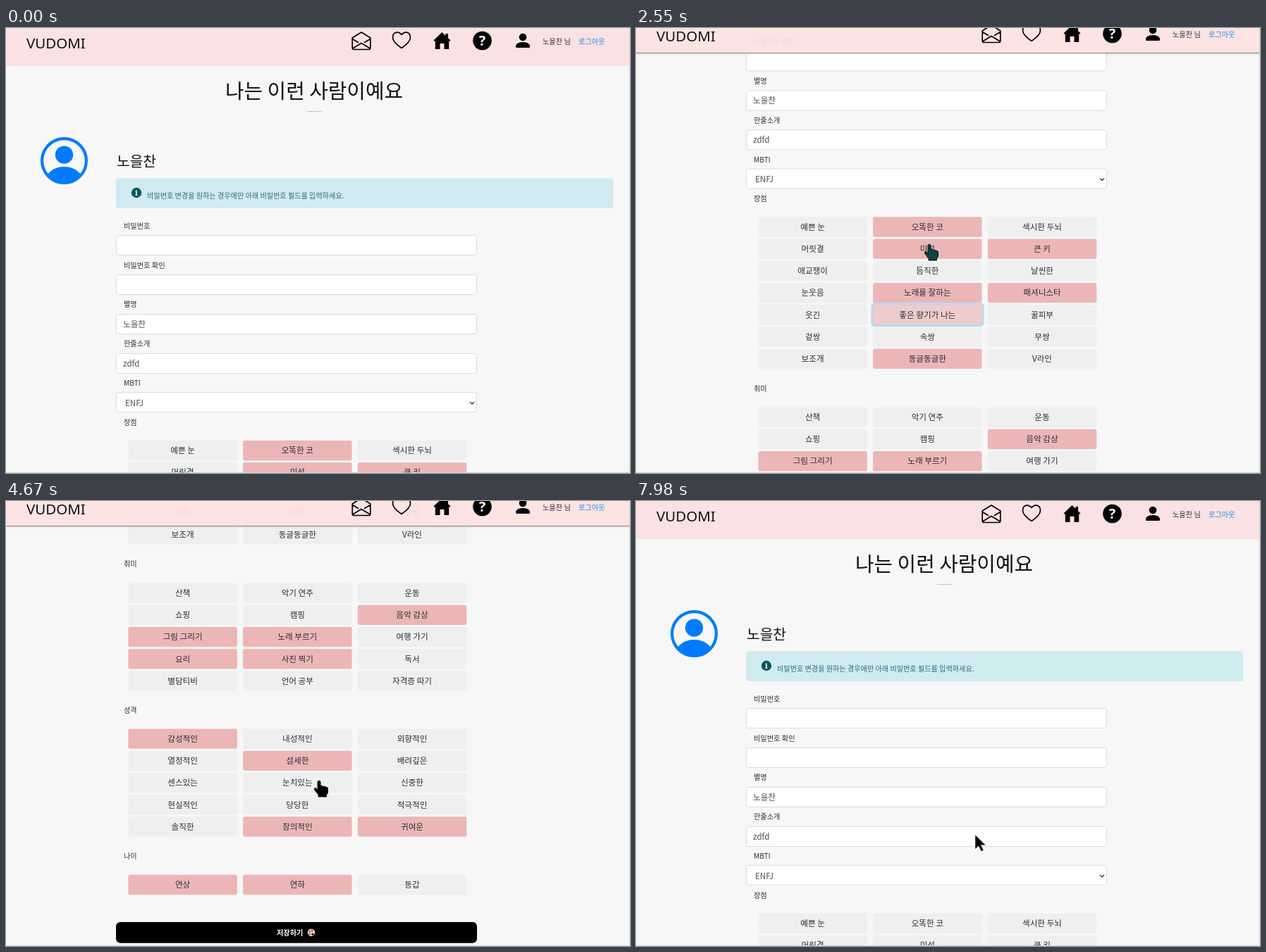
An HTML page with a canvas that plays this animation: 885x632 px, repeating every 8000 ms.

```html
<!DOCTYPE html>
<html lang="ko">
<head>
<meta charset="utf-8">
<style>
html, body { margin: 0; width: 100%; height: 100%; overflow: hidden; background: #f7f7f7; }
canvas { display: block; }
</style>
</head>
<body>
<canvas id="stage" width="885" height="632"></canvas>
<script>
const W = 885, H = 632, LOOP = 8000, RELOAD = 7620;
const ctx = document.getElementById('stage').getContext('2d');
const KR = '"Noto Sans CJK KR", "Noto Sans KR", "Noto Sans CJK", sans-serif';
const INK = '#2a2e32', GRAY = [239, 239, 239], PINK = [236, 182, 183], PALE = [238, 204, 204];
const USER = '노을찬', BRAND = 'VUDOMI';

const TRAITS = '예쁜 눈,오똑한 코,섹시한 두뇌,머릿결,미성,큰 키,애교쟁이,듬직한,날씬한,눈웃음,노래를 잘하는,패셔니스타,웃긴,좋은 향기가 나는,꿀피부,겉쌍,속쌍,무쌍,보조개,동글동글한,V라인';
const HOBBIES = '산책,악기 연주,운동,쇼핑,캠핑,음악 감상,그림 그리기,노래 부르기,여행 가기,요리,사진 찍기,독서,별담티비,언어 공부,자격증 따기';
const NATURE = '감성적인,내성적인,외향적인,열정적인,섬세한,배려깊은,센스있는,눈치있는,신중한,현실적인,당당한,적극적인,솔직한,창의적인,귀여운';
const MY_HOBBIES = [5, 6, 7, 9, 10];

const group = (id, title, labelY, rowY, names, on) =>
  ({ id, title, labelY, rowY, names: names.split(','), on });
const groups = [
  group('a', '장점', 560, 600, TRAITS, [1, 4, 5, 11, 19]),
  group('b', '취미', 829.7, 870.3, HOBBIES, MY_HOBBIES),
  group('c', '성격', 1037.5, 1077.5, NATURE, [4, 5, 7, 8, 10, 11, 14]),
  group('d', '장점', 1340, 1380.5, TRAITS, []),
  group('e', '취미', 1610, 1651, HOBBIES, MY_HOBBIES),
  group('f', '성격', 1818, 1858, NATURE, [0, 4, 13, 14]),
  group('g', '나이', 2025, 2065.3, '연상,연하,동갑', [0, 1])
];

// time, group and index of each toggle
const clicks = [
  [2160, 'a10'], [2380, 'a13'], [2880, 'a4'], [3080, 'a1'],
  [5220, 'f4'], [5640, 'f13'], [6230, 'f14'], [6690, 'g1']
];
const SAVE_CLICK = 7420;

// time, x, y of the pointer tip
const pointer = [
  [660, 250, 640], [880, 294, 458], [1500, 294, 458], [1950, 416, 376], [2200, 416, 378],
  [2340, 416, 408], [2430, 416, 408], [2550, 416, 307], [2900, 416, 305], [3040, 416, 284],
  [3130, 416, 284], [3360, 556, 300], [3500, 556, 300], [3850, 444, 397], [4800, 444, 397],
  [5120, 444, 362], [5280, 444, 362], [5560, 443, 452], [5970, 443, 452], [6160, 560, 452],
  [6300, 560, 452], [6580, 441, 528], [6800, 441, 528], [7080, 430, 592], [7640, 430, 592],
  [7940, 481, 474]
];

const clamp = v => Math.max(0, Math.min(1, v));
const span = (t, a, b) => clamp((t - a) / (b - a));
const smooth = u => u * u * (3 - 2 * u);
const easeOut = u => 1 - (1 - u) ** 3;
const mix = (a, b, u) => a + (b - a) * u;
const mixRgb = (a, b, u) => `rgb(${a.map((v, i) => Math.round(mix(v, b[i], u)))})`;

function scrollAt(t) {
  if (t >= RELOAD) return 0;
  return 215 * smooth(span(t, 800, 1340)) + 102.5 * smooth(span(t, 1480, 1900)) +
    442 * smooth(span(t, 3500, 4200)) + 770 * easeOut(span(t, 4350, 4766));
}

function pointerAt(t) {
  const i = pointer.findIndex(k => k[0] > t);
  if (i < 0) return pointer[pointer.length - 1].slice(1);
  if (i === 0) return null;
  const [a, b] = [pointer[i - 1], pointer[i]];
  const u = smooth(span(t, a[0], b[0]));
  return [mix(a[1], b[1], u), mix(a[2], b[2], u)];
}

function text(s, x, cy, size, color = INK, align = 'left', weight = 400, family = KR) {
  ctx.font = `${weight} ${size}px ${family}`;
  ctx.textAlign = align;
  ctx.fillStyle = color;
  ctx.fillText(s, x, cy + size * 0.37);
}

function box(x, y, w, h, r, fill, stroke, line = 1) {
  ctx.beginPath();
  ctx.roundRect(x, y, w, h, r);
  if (fill) { ctx.fillStyle = fill; ctx.fill(); }
  if (stroke) { ctx.strokeStyle = stroke; ctx.lineWidth = line; ctx.stroke(); }
}

function disc(x, y, r, fill) {
  ctx.beginPath();
  ctx.arc(x, y, r, 0, Math.PI * 2);
  ctx.fillStyle = fill;
  ctx.fill();
}

function at(x, y, draw) {
  ctx.save();
  ctx.translate(x, y);
  draw();
  ctx.restore();
}

function shape(d, fill, stroke, line) {
  const p = new Path2D(d);
  if (fill) { ctx.fillStyle = fill; ctx.fill(p); }
  if (stroke) { ctx.strokeStyle = stroke; ctx.lineWidth = line; ctx.lineJoin = 'round'; ctx.stroke(p); }
}

const HEART = 'M0 10.5C-6 6.5-12.5 1-12.5-4.5C-12.5-12.5-4.5-14 0-8.5C4.5-14 12.5-12.5 12.5-4.5C12.5 1 6 6.5 0 10.5Z';
const HAND = 'M-2 1.5Q0-1.5 2 1.5V8Q4 6.5 5.5 8.5Q7.5 7.3 9 9.3Q12.5 8.5 12.5 12.5V16Q12.5 18.5 10.5 20.5V23H-1V20.5L-6.5 13Q-7.5 10.5-5 10.5L-2 13Z';
const ARROW = 'M0 0V20.5L4.8 16L8.6 23.5L12 22L8.4 14.8H15Z';

function avatar() {
  const blue = '#007bff';
  at(82.5, 188.5, () => {
    disc(0, -8.4, 12.7, blue);
    ctx.save();
    ctx.beginPath();
    ctx.arc(0, 0, 31, 0, Math.PI * 2);
    ctx.clip();
    ctx.beginPath();
    ctx.ellipse(0, 28, 26, 19.6, 0, 0, Math.PI * 2);
    ctx.fill();
    ctx.restore();
    ctx.beginPath();
    ctx.arc(0, 0, 31.4, 0, Math.PI * 2);
    ctx.strokeStyle = blue;
    ctx.lineWidth = 4.2;
    ctx.stroke();
  });
}

function field(label, cy, value, pad = 166) {
  text(label, 167, cy - 28, 10.2);
  box(156.5, Math.round(cy - 14) - 0.5, 511, 28, 3.5, '#fff', '#d8dce0');
  text(value, pad, cy, 11.6, '#495057');
}

function form() {
  text('나는 이런 사람이예요', 437, 89.3, 28.9, '#111', 'center', 300);
  ctx.fillStyle = '#cacaca';
  ctx.fillRect(427, 118, 22, 1);
  avatar();
  text(USER, 157, 189, 20.3, '#111');
  box(156, 213.5, 705, 42.5, 3, '#d0ebf0');
  disc(185, 234, 7.2, '#0c5460');
  text('i', 185, 234, 11, '#fff', 'center', 700, '"Noto Serif", serif');
  text('비밀번호 변경을 원하는 경우에만 아래 비밀번호 필드를 입력하세요.', 200, 238, 10.15, '#2b6c77');
  field('비밀번호', 309, '');
  field('비밀번호 확인', 365, '');
  field('별명', 420.7, USER);
  field('한줄소개', 476.5, 'zdfd');
  field('MBTI', 532.3, 'ENFJ', 169);
  shape('M658 531L661 534L664 531', null, '#343a40', 1.4);
}

function chip(key, name, isOn, x, cy, t) {
  let on = isOn, since = -1e4;
  for (const [time, k] of clicks) if (k === key && time <= t) { on = !on; since = time; }
  const last = clicks.filter(c => c[0] <= t).pop();
  let focus = last && last[1] === key && t < SAVE_CLICK;
  if (t >= RELOAD) on = focus = false;
  const goal = on ? (focus ? PALE : PINK) : GRAY;
  const from = since > 0 ? (on ? GRAY : PINK) : goal;
  const fill = mixRgb(from, goal, t >= RELOAD ? 1 : span(t, since, since + 120));
  if (focus) box(x - 2.7, cy - 17, 160, 34, 5, '#b7d8fa');
  box(x, cy - 14.2, 154.5, 28.4, 3, fill);
  text(name, x + 77.2, cy, 11.6, INK, 'center');
}

function saveButton(t) {
  const k = 1 + 0.05 * smooth(span(t, 6990, 7140));
  at(412, 2133.2, () => {
    ctx.scale(k, k);
    box(-256, -14.8, 512, 29.6, 6, '#000');
    text('저장하기', -28, 0, 10.2, '#fff', 'left', 700);
    disc(21, 0, 5.3, '#e9c4bd');
    disc(23, 2.4, 1.5, '#000');
    disc(18.6, -1.5, 1.2, '#d33b45');
    disc(22, -2.8, 1.2, '#7a4a50');
    disc(18.8, 2, 1.1, '#8a5a48');
  });
}

function page(t, top) {
  ctx.save();
  ctx.translate(0, -top);
  form();
  for (const g of groups) {
    text(g.title, 167, g.labelY, 10.2);
    g.names.forEach((name, i) => {
      const y = g.rowY + Math.floor(i / 3) * 31.2;
      if (y > top - 30 && y < top + H + 30)
        chip(g.id + i, name, g.on.includes(i), 173.4 + (i % 3) * 162.7, y, t);
    });
  }
  at(212, 1275, () => { ctx.scale(1.18, 1.18); shape(HEART, '#f8312f'); });
  text('이런 분이 좋아요', 240, 1273, 28.9, '#111', 'left', 300);
  saveButton(t);
  ctx.restore();
}

function icons() {
  const k = '#000';
  at(504, 0, () => shape('M-12.8-4L0-12L12.8-4V10Q12.8 12.5 10.5 12.5H-10.5Q-12.8 12.5-12.8 10ZM-12.8-2.5L-4 2.8M12.8-2.5L4 2.8M-12.3 11L0 3.5L12.3 11', null, k, 1.7));
  at(561, 0, () => shape(HEART, null, k, 1.7));
  at(618.5, 0, () => shape('M0-12L5-7V-10H8.5V-3.7L12-.5L10.5 1L9.7.3V12H3V4H-3V12H-9.7V.3L-10.5 1L-12-.5Z', k));
  disc(675.5, 0, 13.3, k);
  text('?', 675.5, 0, 20, '#fff', 'center', 700, '"Open Sans", sans-serif');
  disc(733, -5, 5.3, k);
  shape('M723 8.5Q723 2 733 2Q743 2 743 8.5Q743 10 741.5 10H724.5Q723 10 723 8.5Z', k);
}

function header(t) {
  const p = t >= RELOAD ? 0 : span(t, 1230, 1430);
  const h = 54 - 18 * p;
  ctx.save();
  if (p > 0) {
    ctx.shadowColor = `rgba(0,0,0,${0.5 * p})`;
    ctx.shadowBlur = 3;
    ctx.fillStyle = `rgba(150,140,140,${p})`;
    ctx.fillRect(0, h - 1, W, 1);
    ctx.shadowColor = 'transparent';
  }
  ctx.globalAlpha = 0.94;
  ctx.fillStyle = mixRgb([251, 225, 228], [255, 227, 227], p);
  ctx.fillRect(0, 0, W, h - (p > 0 ? 1 : 0));
  ctx.restore();
  text(BRAND, 29, 21 - 10 * p ** 3.15, 20.5, '#111', 'left', 400, '"Noto Sans", sans-serif');
  at(0, 18 - 10 * p, icons);
  text(USER + ' 님', 761, 19 - 10 * p, 10.2);
  text('로그아웃', 812, 19 - 10 * p, 10.2, '#1c8ceb');
}

function cursor(t) {
  const pos = pointerAt(t);
  if (!pos) return;
  const pressed = [...clicks.map(c => c[0]), SAVE_CLICK].some(c => t > c - 70 && t < c + 50);
  const teal = (t > 2100 && t < 4320) || (t > 5140 && t < RELOAD);
  const arrow = t < 860 || t > 7700;
  at(pos[0], pos[1], () => {
    if (pressed) disc(-1, 0, 9, 'rgba(241,216,62,.9)');
    if (arrow) shape(ARROW, '#000', 'rgba(255,255,255,.6)', 0.8);
    else shape(HAND, teal ? '#0d4548' : '#000', '#0a0a0a', 1);
  });
}

function frame(now) {
  const t = now % LOOP;
  ctx.fillStyle = '#f7f7f7';
  ctx.fillRect(0, 0, W, H);
  page(t, scrollAt(t));
  header(t);
  ctx.fillStyle = '#d2d2d2';
  ctx.fillRect(W - 1, 0, 1, H);
  ctx.fillRect(0, H - 1, W, 1);
  cursor(t);
  requestAnimationFrame(frame);
}
requestAnimationFrame(frame);
</script>
</body>
</html>
```
